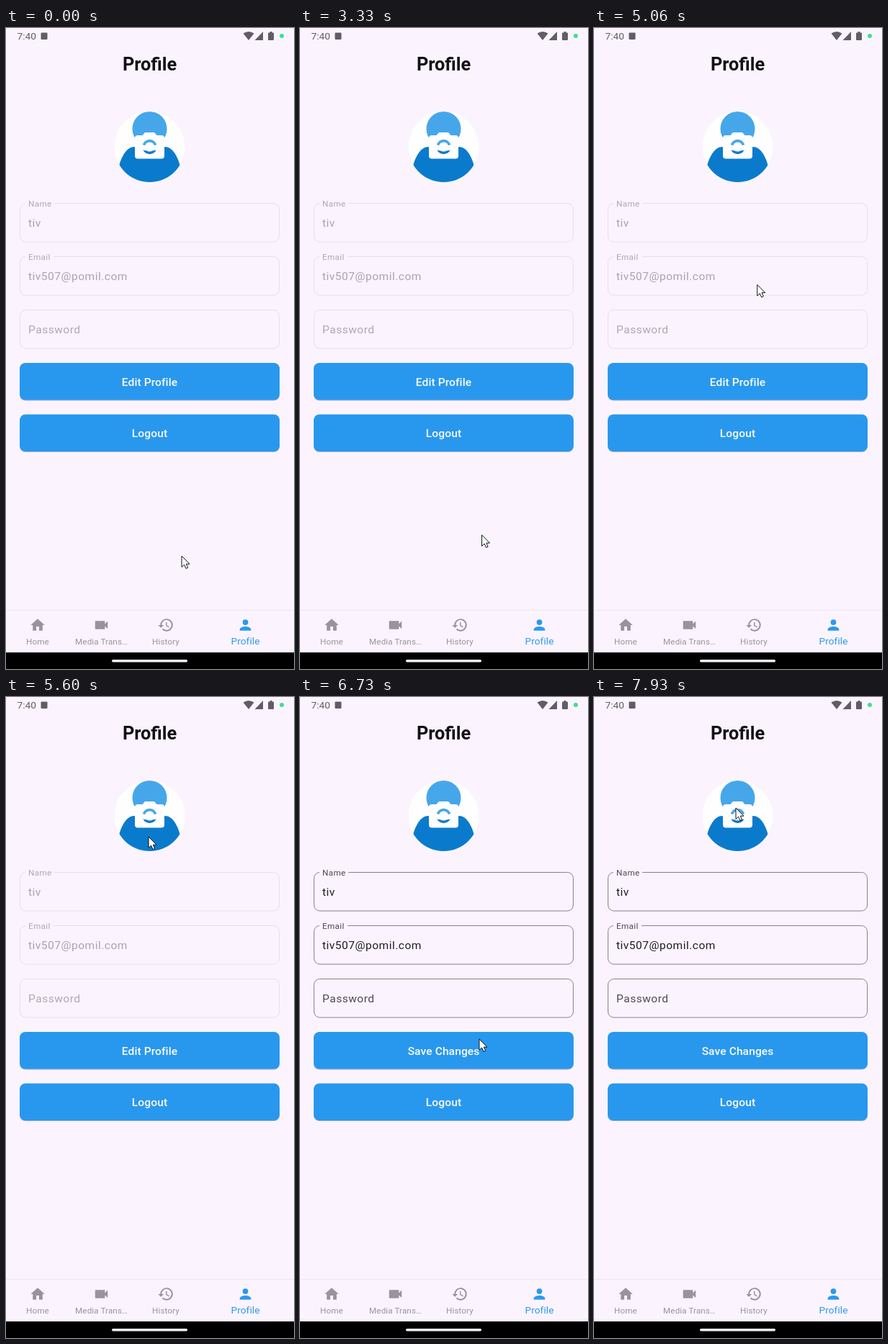
An HTML page that plays this animation: 400 px wide and 890 px high, repeating every 8 s.

```html
<!DOCTYPE html>
<html lang="en">
<head>
<meta charset="utf-8">
<title>Profile screen</title>
<style>
html, body { margin: 0; height: 100%; overflow: hidden; background: #fbf4fe; }
svg { display: block; width: 400px; height: 890px; font-family: Roboto, sans-serif; }
.mid { text-anchor: middle; }
.title { font-size: 25.3px; font-weight: 700; fill: #121014; }
.input { font-size: 15.55px; letter-spacing: .486px; }
.label { font-size: 11.66px; letter-spacing: .365px; }
.action { font-size: 15.55px; font-weight: 500; letter-spacing: .1px; fill: #fcfaff; }
.nav { font-size: 11.66px; letter-spacing: .1px; }
</style>
</head>
<body>
<svg viewBox="0 0 400 890">
  <defs>
    <clipPath id="round"><circle cx="199.5" cy="165" r="49"/></clipPath>
  </defs>
  <rect width="400" height="890" fill="#fbf4fe"/>

  <g fill="#615d64">
    <text x="15.5" y="16" font-size="13.7">7:40</text>
    <rect x="48.5" y="6.5" width="9" height="9.5" rx="1"/>
    <path d="M337 17 329.5 7.5Q337 2.5 344.5 7.5ZM345.5 17H357V5Z"/>
    <path d="M366.5 6.5V5h3v1.5h1.5q1 0 1 1V16q0 1-1 1h-6q-1 0-1-1V7.5q0-1 1-1Z"/>
  </g>
  <circle cx="383" cy="11" r="3" fill="#41e08a"/>
  <text class="title mid" x="199.5" y="58.5">Profile</text>

  <g clip-path="url(#round)">
    <circle cx="199.5" cy="165" r="49" fill="#fefeff"/>
    <circle cx="199.5" cy="140" r="24" fill="#45a7ea"/>
    <path fill="#0a7bcc" d="M157 192C161 176 169 165 178 165Q199.5 176 221 165C230 165 238 176 242 192V215H157Z"/>
  </g>
  <path fill="#fefeff" fill-rule="evenodd" d="M183 149H189.5L193 145H206L209.5 149H216q4 0 4 4V177.5q0 4-4 4H183q-4 0-4-4V153q0-4 4-4ZM189.3 165a10.2 10.2 0 1 0 20.4 0a10.2 10.2 0 1 0-20.4 0Z"/>
  <circle cx="199.5" cy="165" r="6.6" fill="#fefeff"/>

  <g id="fields"></g>
  <g id="buttons"></g>

  <path d="M0 808.5H400" stroke="#eee7f2"/>
  <g id="tabs"></g>
  <rect y="867" width="400" height="23" fill="#000"/>
  <rect x="147" y="877" width="105" height="3.5" rx="1.75" fill="#f8f3fb"/>

  <path id="cursor" d="M0 0V15.5L3.6 12.2 6 17.5 8.6 16.3 6.3 11.2H11Z" fill="#fff" stroke="#121014" stroke-linejoin="round"/>
</svg>
<script>
const LOOP = 8000, EDIT_AT = 6520;
const $ = id => document.getElementById(id);

// Outlined inputs: top edge, floating label, label width, content
const fields = [
  [243.5, 'Name', 40, 'tiv'],
  [317.5, 'Email', 39, 'tiv507@pomil.com'],
  [391.5, '', 0, 'Password'],
];
$('fields').innerHTML = fields.map(([y, label, gap, value]) => `
  <rect class="border" x="19.5" y="${y}" width="360" height="53.5" rx="8" fill="none"/>
  <rect x="27" y="${y - 2}" width="${gap}" height="4" fill="#fbf4fe"/>
  <text class="label hint" x="31" y="${y + 4.3}">${label}</text>
  <text class="input ${label ? 'value' : 'hint'}" x="31" y="${y + 32}">${value}</text>`).join('');

$('buttons').innerHTML = [['edit', 465], ['logout', 536.5]].map(([id, y]) => `
  <rect x="19" y="${y + 1}" width="361" height="51.5" rx="8" fill="#bcb8c6"/>
  <rect x="19" y="${y}" width="361" height="51.5" rx="8" fill="#2898ee"/>
  <text class="action mid" id="${id}" x="199.5" y="${y + 31.5}">Logout</text>`).join('');

const tabs = [
  [44, 'Home', 'M10 20v-6h4v6h5v-8h3L12 3 2 12h3v8z'],
  [132.5, 'Media Trans…', 'M17 10.5V7c0-.55-.45-1-1-1H4c-.55 0-1 .45-1 1v10c0 .55.45 1 1 1h12c.55 0 1-.45 1-1v-3.5l4 4v-11z'],
  [222, 'History', 'M13 3a9 9 0 0 0-9 9H1l3.89 3.89.07.14L9 12H6a7 7 0 1 1 2.06 4.94l-1.42 1.42A9 9 0 1 0 13 3zm-1 5v5l4.28 2.54.72-1.21-3.5-2.08V8z'],
  [332.5, 'Profile', 'M12 12a4 4 0 1 0 0-8 4 4 0 0 0 0 8zm0 2c-2.67 0-8 1.34-8 4v2h16v-2c0-2.66-5.33-4-8-4z'],
];
$('tabs').innerHTML = tabs.map(([x, label, icon], i) => `
  <g fill="${i == 3 ? '#2d99ec' : '#98939c'}">
    <path transform="translate(${x - 11.66} 817.3) scale(.972)" d="${icon}"/>
    <text class="nav mid" x="${x}" y="${i == 3 ? 855.5 : 856}" ${i == 3 ? 'style="font-size:13.6px"' : ''}>${label}</text>
  </g>`).join('');

// Pointer stops: time, x, y
const stops = [
  [0, 244, 733], [2400, 244, 733], [4530, 265, 600], [5500, 198, 194], [5750, 198, 194],
  [6350, 254, 494], [6530, 254, 494], [6730, 249, 475], [7550, 197, 154], [LOOP, 197, 154],
];
const mix = (a, b, p) => a + (b - a) * p;
const span = (t, a, b) => Math.max(0, Math.min(1, (t - a) / (b - a)));
const tint = (a, b, p) => `rgb(${a.map((v, i) => Math.round(mix(v, b[i], p)))})`;
const setAll = (cls, attr, value) =>
  document.querySelectorAll(cls).forEach(el => el.setAttribute(attr, value));

const slope = (i, k) => (stops[i + 1][k] - stops[i][k]) / (stops[i + 1][0] - stops[i][0]);

// Speed at a stop: carries on through it, but rests where the direction turns
function speed(i, k) {
  if (i == 0 || i == stops.length - 1) return 0;
  const a = slope(i - 1, k), b = slope(i, k);
  return a * b > 0 ? 2 * a * b / (a + b) : 0;
}

function pointer(t) {
  const i = stops.findIndex(s => s[0] > t) - 1;
  const from = stops[i], to = stops[i + 1], d = to[0] - from[0];
  const p = (t - from[0]) / d, q = 1 - p;
  return [1, 2].map(k => mix(from[k], to[k], p * p * (3 - 2 * p))
    + d * p * q * (q * speed(i, k) - p * speed(i + 1, k)));
}

function draw(now) {
  const t = now % LOOP, editing = t >= EDIT_AT;
  const fade = span(t, 6540, 6720);
  $('cursor').setAttribute('transform', `translate(${pointer(t)})`);
  $('edit').textContent = editing ? 'Save Changes' : 'Edit Profile';
  setAll('.value', 'fill', editing ? '#1f1c22' : '#a9a3ad');
  setAll('.hint', 'fill', tint([174, 168, 180], [78, 73, 84], fade));
  setAll('.border', 'stroke', tint([231, 222, 238], [136, 130, 141], fade));
  requestAnimationFrame(draw);
}
requestAnimationFrame(draw);
</script>
</body>
</html>
```
